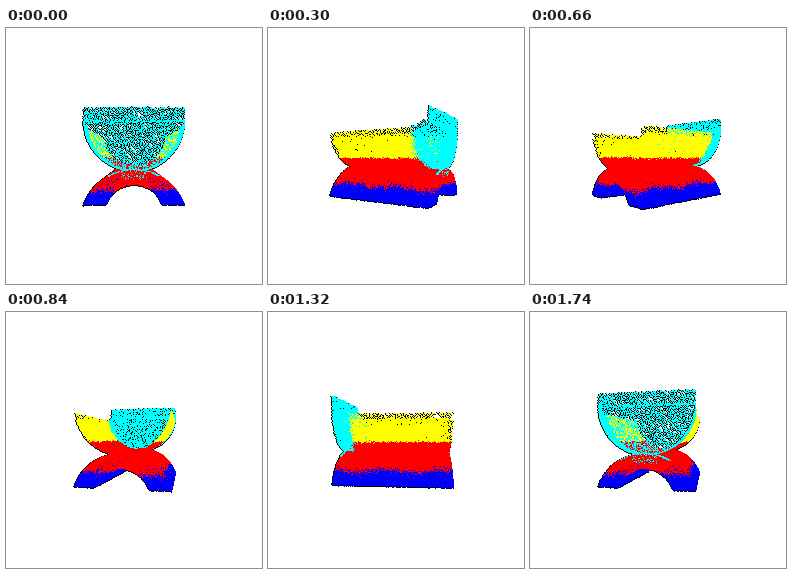
Write a matplotlib script that moves like this. It is 256 px wide and 256 px high and loops after 1.8 s.

```python
import numpy as np
import matplotlib.pyplot as plt
from matplotlib.animation import FuncAnimation

SIZE, FRAMES, INTERVAL = 256, 30, 60
FOCAL, DIST, HALF = 225, 5.74, 1.286   # camera and half length of the chair
CYAN, YELLOW, RED, BLUE = np.array(
    [[0, 255, 255], [255, 255, 0], [255, 0, 0], [0, 0, 255]], dtype=np.uint8)

rng = np.random.default_rng(4)


def span(n, lo=-HALF, hi=HALF):
    return rng.uniform(lo, hi, n)


def arc(n, center, radius, half_width, sign=1):
    """Random points on a circular shell running along the chair."""
    top = np.arcsin(min(1, half_width / radius))
    phi = span(n, -top, top)
    return np.column_stack([radius * np.sin(phi),
                            center + sign * radius * np.cos(phi), span(n)])


def thin(sparse, share):
    """Mask that keeps only a share of the points in a sparse zone."""
    return ~sparse | (rng.random(len(sparse)) < share)


def paint(points, color):
    return points, np.tile(color, (len(points), 1))


def seat(n=45000):
    p = arc(n, 0.7, 1, 1, -1)
    h, z = p[:, 1], p[:, 2]
    rim = 0.57 + 0.15 * np.clip((z - HALF + 0.4) / 0.4, 0, 1)
    keep = (h < rim) & thin(h > rim - 0.12, 0.25)
    keep &= thin((z < 0.1 - HALF) & (h > 0), 0.3)
    p, h, z = p[keep], h[keep], z[keep]
    pts, col = paint(p, YELLOW)
    col[h + rng.normal(0, 0.015, len(h)) < -0.04] = RED
    width = np.where(h > -0.1, 0.38, 0.3) + rng.normal(0, 0.04, len(h))
    col[z > HALF - width] = CYAN
    return pts, col


def back(n=4600):
    a, h = span(n, -1, 1), span(n, -0.3, 0.97)
    keep = (h > 0.7) | (a**2 + (h - 0.7)**2 < 1)
    a, h = a[keep], h[keep]
    # seam across the back and the joint below it
    a = np.r_[a, span(260, -1, 1), span(90, -0.25, 0.25)]
    h = np.r_[h, rng.normal(0.69, 0.01, 260), span(90, -0.46, -0.28)]
    z = np.full(len(a), HALF) + rng.normal(0, 0.008, len(a))
    return paint(np.column_stack([a, h, z]), CYAN)


def legs():
    outer = arc(40000, -1.33, 1.06, 1)
    inner = arc(20000, -1.176, 0.606, 0.57)
    n = 10000
    feet = np.column_stack([span(n, 0.57, 1) * rng.choice([-1, 1], n),
                            np.full(n, -0.97), span(n)])
    n = 16000
    a, h = span(n, -1, 1), span(n, -0.97, -0.27)
    solid = (np.hypot(a, h + 1.33) < 1.06) & (np.hypot(a, h + 1.176) > 0.606)
    ends = np.column_stack([a, h, HALF * rng.choice([-1, 1], n)])[solid]

    p = np.vstack([outer, inner, feet, ends])
    pts, col = paint(p[thin(p[:, 1] < -0.91, 0.4)], RED)
    a, h, z = pts.T
    edge = -0.68 + 0.03 * np.sin(5 * z + a) + rng.normal(0, 0.04, len(h))
    col[h < edge] = BLUE
    on_top = np.abs(np.hypot(a, h + 1.33) - 1.06) < 0.01
    col[on_top & (z > HALF - 0.05) & (np.abs(a) < 0.52)] = CYAN
    return pts, col


parts = [seat(), back(), legs()]
points = np.vstack([p for p, _ in parts])
colors = np.vstack([c for _, c in parts])


def render(theta):
    a, h, z = points.T
    c, s = np.cos(theta), np.sin(theta)
    depth = DIST - (z * c - a * s)
    scale = FOCAL / depth
    x = np.floor(128.2 + scale * (z * s + a * c)).astype(int)
    y = np.floor(128 - scale * h).astype(int)
    img = np.full((SIZE, SIZE, 3), 255, np.uint8)
    # dark rims lie under every lit dot, so they show only where dots are sparse
    for dx, dy in [(-1, 0), (0, 1)]:
        img[y + dy, x + dx] = 0
    order = np.argsort(-depth)
    img[y[order], x[order]] = colors[order]
    return img


fig = plt.figure(figsize=(2.56, 2.56), dpi=100, facecolor="white")
ax = fig.add_axes([0, 0, 1, 1])
ax.axis("off")
view = ax.imshow(render(0), interpolation="nearest", aspect="auto")


def update(i):
    view.set_data(render(2 * np.pi * i / FRAMES))
    return [view]


anim = FuncAnimation(fig, update, frames=FRAMES, interval=INTERVAL,
                     repeat=True, repeat_delay=0)
plt.show()
```
